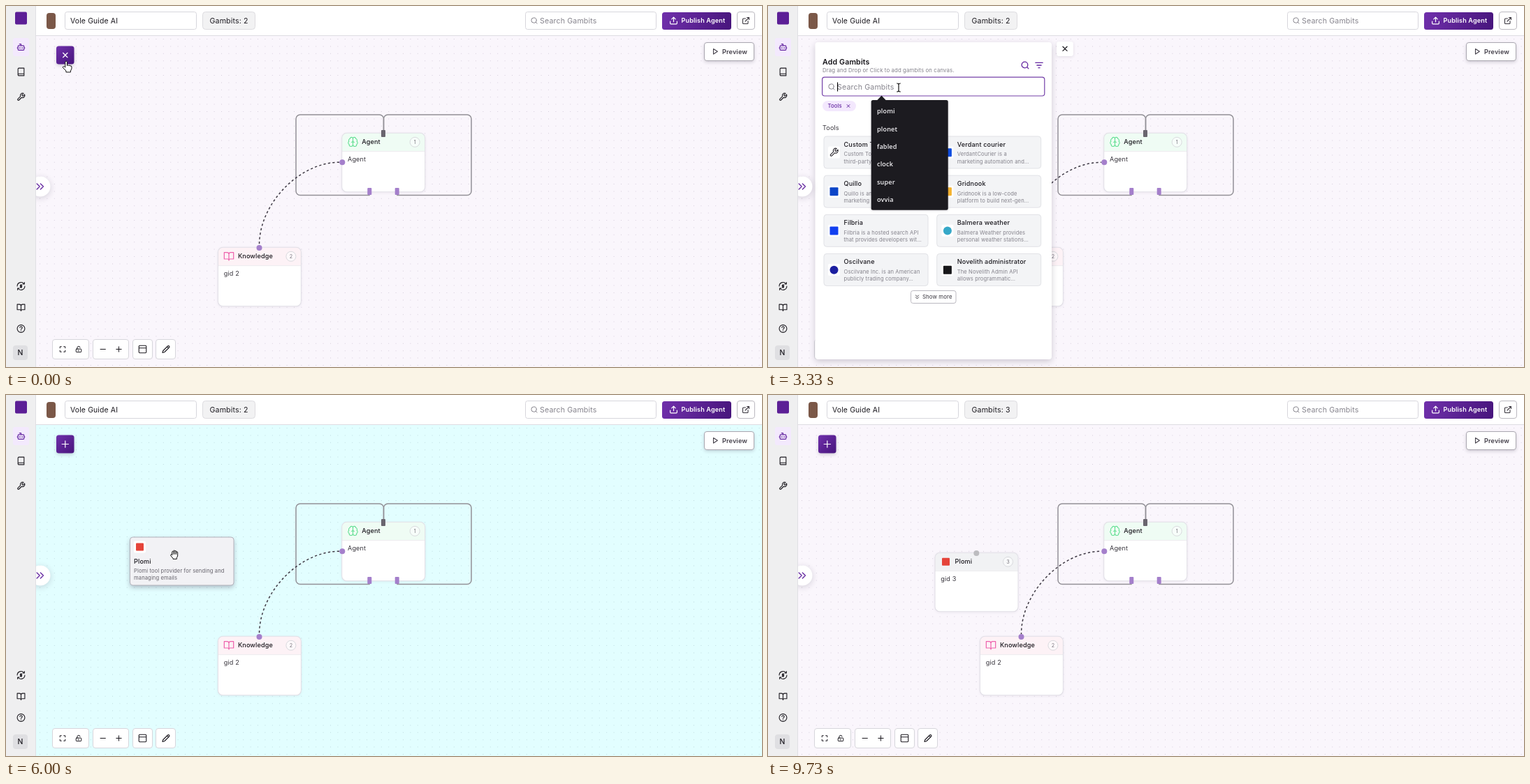
An HTML page with a canvas that plays this animation: 1082 by 518 pixels, repeating every 9.8 s.

```html
<!DOCTYPE html>
<html lang="en">
<head>
<meta charset="utf-8">
<title>Agent builder</title>
<style>
html, body { margin: 0; width: 100%; height: 100%; overflow: hidden; background: #fff; }
canvas { display: block; width: 1082px; height: 518px; }
</style>
</head>
<body>
<canvas id="stage"></canvas>
<script>
const W = 1082, H = 518, LOOP = 9800;
const canvas = document.getElementById('stage');
const dpr = window.devicePixelRatio || 1;
canvas.width = W * dpr;
canvas.height = H * dpr;
const c = canvas.getContext('2d');

const PURPLE = '#6427a0', INK = '#1c1a20', GRAY = '#85838c', LINE = '#d7d6dc', LILAC = '#a47fcb';

// Event times in ms
const T = { open: 100, filter: 1600, focus: 2150, results: 3900, grab: 5080, drop: 6170, loaded: 8400 };
const KEYS = [3350, 3550, 3750, 3950, 4150];
const WORD = 'plomi';

const ICON = {
  search: 'M19 11a8 8 0 1 1-16 0a8 8 0 1 1 16 0M21 21l-4.3-4.3',
  upload: 'M12 15V3M7 8l5-5l5 5M3 14v5a2 2 0 0 0 2 2h14a2 2 0 0 0 2-2v-5',
  external: 'M15 3h6v6M10 14L21 3M18 13v6a2 2 0 0 1-2 2H5a2 2 0 0 1-2-2V8a2 2 0 0 1 2-2h6',
  play: 'M6 3l14 9l-14 9z',
  bot: 'M12 8V4H8M6 8h12a2 2 0 0 1 2 2v8a2 2 0 0 1-2 2H6a2 2 0 0 1-2-2v-8a2 2 0 0 1 2-2zM2 14h2M20 14h2M15 13v2M9 13v2',
  book: 'M4 19.5v-15A2.5 2.5 0 0 1 6.5 2H20v20H6.5a2.5 2.5 0 0 1 0-5H20',
  wrench: 'M14.7 6.3a1 1 0 0 0 0 1.4l1.6 1.6a1 1 0 0 0 1.4 0l3.8-3.8a6 6 0 0 1-7.9 7.9l-6.9 6.9a2.1 2.1 0 0 1-3-3l6.9-6.9a6 6 0 0 1 7.9-7.9z',
  money: 'M2 12a10 10 0 0 1 18-6M21 2v4.5h-4.5M22 12a10 10 0 0 1-18 6M3 22v-4.5h4.5M14.5 9.5h-3.5a1.2 1.2 0 0 0 0 2.5h2a1.2 1.2 0 0 1 0 2.5h-3.5M12 7.5v9',
  pages: 'M2 4h6a4 4 0 0 1 4 4v13a3 3 0 0 0-3-3H2zM22 4h-6a4 4 0 0 0-4 4v13a3 3 0 0 1 3-3h7z',
  help: 'M22 12a10 10 0 1 1-20 0a10 10 0 1 1 20 0M9 9a3 3 0 0 1 6 1c0 2-3 2.5-3 4M12 17v.3',
  chevrons: 'M4 5l7 7l-7 7M13 5l7 7l-7 7',
  down: 'M7 6l5 5l5-5M7 13l5 5l5-5',
  cross: 'M5 5l14 14M19 5L5 19',
  plus: 'M12 4v16M4 12h16',
  minus: 'M4 12h16',
  filter: 'M2 5h20M6 12h12M10 19h4',
  expand: 'M3 8V3h5M16 3h5v5M21 16v5h-5M8 21H3v-5',
  lock: 'M5 11h14a2 2 0 0 1 2 2v7a2 2 0 0 1-2 2H5a2 2 0 0 1-2-2v-7a2 2 0 0 1 2-2zM7 11V7a5 5 0 0 1 9.9-1M12 15v3',
  panel: 'M5 3h14a2 2 0 0 1 2 2v14a2 2 0 0 1-2 2H5a2 2 0 0 1-2-2V5a2 2 0 0 1 2-2zM3 9h18',
  pencil: 'M17 3a2.8 2.8 0 0 1 4 4L7.5 20.5L2 22l1.5-5.5zM15 5l4 4',
  brain: 'M12 5a3 3 0 0 0-6 0a4 4 0 0 0-2.5 5.8a4 4 0 0 0 .5 6.6A4 4 0 0 0 12 18zM12 5a3 3 0 0 1 6 0a4 4 0 0 1 2.5 5.8a4 4 0 0 1-.5 6.6A4 4 0 0 1 12 18zM9 13a4 4 0 0 0 3-4a4 4 0 0 0 3 4',
  file: 'M4 8V4a2 2 0 0 1 2-2h9l5 5v13a2 2 0 0 1-2 2H6a2 2 0 0 1-2-2v-3M15 2v5h5M14 13H2M6 9l-4 4l4 4',
  pointer: 'M8 13V3.5a1.8 1.8 0 0 1 3.6 0V10l1-.7l2 .7l1.5-.3l1.5 1l1.6-.2l1 1.6v4l-2 4v2.5H9.5V20L4 14.5a1.7 1.7 0 0 1 2.3-2.6z',
  hand: 'M7 13V6.5a1.5 1.5 0 0 1 3 0V4.5a1.5 1.5 0 0 1 3 0v.8a1.5 1.5 0 0 1 3 0v2a1.5 1.5 0 0 1 3 0V15l-2 4v2.5H9V20l-5-6a1.6 1.6 0 0 1 2.4-2zM10 6.5V11M13 5.5V11M16 7V11'
};
for (const k in ICON) ICON[k] = new Path2D(ICON[k]);

// name, description lines, mark colour, round mark
const TOOLS = [
  ['Custom Tools', 'Custom Tools provider for', 'third-party API integrations…', null],
  ['Verdant courier', 'VerdantCourier is a', 'marketing automation and…', '#0d4de0'],
  ['Quillo', 'Quillo is an SEO and', 'marketing platform offering…', '#0c45c8'],
  ['Gridnook', 'Gridnook is a low-code', 'platform to build next-gen…', '#f5b32e'],
  ['Filbria', 'Filbria is a hosted search API', 'that provides developers wit…', '#123ff0'],
  ['Balmera weather', 'Balmera Weather provides', 'personal weather stations…', '#36a8c8', 1],
  ['Oscilvane', 'Oscilvane Inc. is an American', 'publicly trading company…', '#1c1fa0', 1],
  ['Novelith administrator', 'The Novelith Admin API', 'allows programmatic…', '#17171a']
];
const FOUND = [
  ['Plomi', 'Plomi tool provider for', 'sending and managing…', '#e5443a'],
  ['Tallposter', 'Tallposter is an email', 'marketing platform designe…', '#4a9bdc', 1],
  ['Plonetsuper', 'Plonet Super App combines', 'all Plonet services including…', '#4285f4', 1],
  ['Plonettasks', 'Plonet Tasks provides a', 'simple to-do list and task…', '#2a6cf0', 1]
];
const HINTS = ['plomi', 'plonet', 'fabled', 'clock', 'super', 'ovvia'];

// Cursor path: time, x, y
const PATH = [
  [0, 86, 80], [250, 86, 80], [800, 106, 99], [880, 106, 99], [1070, 128, 123], [1400, 158, 145],
  [1700, 158, 145], [2130, 187, 117], [4250, 187, 117], [4600, 147, 188], [4900, 144, 212],
  [5070, 144, 212], [5950, 241, 229], [6900, 241, 229], [7700, 190, 333], [7820, 190, 333],
  [8000, 181, 347], [8150, 181, 347], [8900, 82, 534]
];

const clamp = v => Math.max(0, Math.min(1, v));
const ease = v => { v = clamp(v); return v * v * (3 - 2 * v); };

function text(s, x, cy, size, color = INK, weight = 400, align = 'left', family = 'Inter') {
  c.font = `${weight} ${size}px ${family}, sans-serif`;
  c.letterSpacing = size * 0.015 + 'px';
  c.textAlign = align;
  c.fillStyle = color;
  c.fillText(s, x, cy + size * 0.36);
}

const note = (s, x, cy, color = GRAY) => text(s, x, cy, 7.6, color);

function box(x, y, w, h, r, fill, stroke, lw = 1) {
  c.beginPath();
  c.roundRect(x, y, w, h, r);
  if (fill) { c.fillStyle = fill; c.fill(); }
  if (stroke) { c.strokeStyle = stroke; c.lineWidth = lw; c.stroke(); }
}

function disc(x, y, r, fill, stroke) {
  box(x - r, y - r, 2 * r, 2 * r, r, fill, stroke);
}

function shadow(blur, dy, alpha, draw) {
  c.save();
  c.shadowColor = `rgba(40,30,60,${alpha})`;
  c.shadowBlur = blur * dpr;
  c.shadowOffsetY = dy * dpr;
  draw();
  c.restore();
}

function icon(name, x, y, size, color, lw = 1.2, fill) {
  const k = size / 24;
  c.save();
  c.translate(x - size / 2, y - size / 2);
  c.scale(k, k);
  c.lineCap = c.lineJoin = 'round';
  c.lineWidth = lw / k;
  c.strokeStyle = color;
  if (fill) { c.fillStyle = fill; c.fill(ICON[name]); }
  c.stroke(ICON[name]);
  c.restore();
}

function mark(x, y, color, round, r = 7) {
  if (round) disc(x, y, r, color);
  else box(x - r, y - r, 2 * r, 2 * r, 1, color);
}

function purple(x, y, w, h) {
  const g = c.createLinearGradient(x, y, x + w, y + h);
  g.addColorStop(0, '#7030ab');
  g.addColorStop(1, '#47157c');
  box(x, y, w, h, 3.5, g);
}

function dots(cyan) {
  c.fillStyle = cyan ? '#e2feff' : '#faf6fc';
  c.fillRect(43, 42, W, H);
  c.fillStyle = cyan ? '#bfdbe0' : '#d6cedc';
  c.beginPath();
  for (let y = 47; y < H; y += 10.4)
    for (let x = 48; x < W; x += 10.4) c.rect(x, y, 1, 1);
  c.fill();
}

function loopEdge(x0, side) {
  c.beginPath();
  c.moveTo(x0, 268);
  c.lineTo(x0, 271.5);
  c.arcTo(side, 271.5, side, 156, 6);
  c.arcTo(side, 156, 540.5, 156, 6);
  c.arcTo(540.5, 156, 540.5, 180, 6);
  c.lineTo(540.5, 180);
  c.strokeStyle = '#929096';
  c.lineWidth = 1.5;
  c.stroke();
}

function node(x, y, title, body, tint, count) {
  shadow(4, 1, 0.08, () => box(x, y, 119, 84.5, 7, '#fff'));
  box(x, y, 119, 26, [7, 7, 0, 0], tint);
  c.fillStyle = '#e8e7ec';
  c.fillRect(x, y + 26, 119, 0.8);
  box(x, y, 119, 84.5, 7, null, '#e2e0e7', 1.1);
  text(title, x + 28.5, y + 12.7, 9.1, INK, 500);
  text(body, x + 8.3, y + 37.5, 9.1, '#39363e');
  if (count) {
    disc(x + 104.5, y + 13, 7, 'rgba(255,255,255,.5)', '#d9dade');
    text(count, x + 104.5, y + 13, 7.2, '#77747d', 400, 'center');
  }
}

function graph(t) {
  loopEdge(520, 415);
  loopEdge(560, 666);
  node(480.7, 182.3, 'Agent', 'Agent', '#effcf4', '1');
  icon('brain', 496.5, 195, 16, '#62df92', 1.1);
  node(303.4, 346.3, 'Knowledge', 'gid 2', '#fdf2f6', '2');
  icon('pages', 319, 359, 16, '#ee62ad', 1.2);

  c.save();
  c.setLineDash([3.25, 3.25]);
  c.lineDashOffset = -6.5 * (t % 500) / 500;
  c.beginPath();
  c.moveTo(477, 224.3);
  c.bezierCurveTo(419.75, 224.3, 362.5, 283.6, 362.5, 343);
  c.strokeStyle = '#3f3a45';
  c.lineWidth = 1.5;
  c.stroke();
  c.restore();

  box(537, 178, 6, 10, 1, '#6a656f');
  box(517.3, 261, 6, 10, 1, LILAC);
  box(556.7, 261, 6, 10, 1, LILAC);
  disc(481.3, 224.3, 4, LILAC);
  disc(362.5, 347, 4, LILAC);
  if (t >= T.drop) newNode(t);
}

function newNode(t) {
  const done = t >= T.loaded;
  node(239, 226.3, 'Plomi', done ? 'gid 3' : 'Loading…', '#f1f2f4', done ? '3' : '');
  mark(254.5, 239.3, '#e5443a', false, 5.5);
  if (!done) {
    disc(338.5, 239.3, 10.8, '#f7f7f8', '#dcdce0');
    const a = t / 1000 * Math.PI * 2 + 1;
    c.beginPath();
    c.arc(338.5, 239.3, 5, a, a + 4.6);
    c.strokeStyle = '#3d3a42';
    c.lineWidth = 1.2;
    c.stroke();
  }
  disc(298.3, 227, 4, '#bcbcbf');
}

function canvasTools(t) {
  shadow(5, 2, 0.2, () => purple(72, 57.5, 25.5, 26));
  icon(t < T.grab ? 'cross' : 'plus', 84.8, 70.5, t < T.grab ? 11 : 14, '#fff', 1.2);
  for (const [x, w] of [[66.5, 52], [124.5, 51], [181.5, 28], [214.5, 28]])
    box(x, 478.5, w, 28, 3.5, '#fff', LINE);
  icon('expand', 81, 492.5, 10, INK, 1);
  icon('lock', 104, 492.5, 10, INK, 1);
  icon('minus', 138.7, 492.5, 11, INK, 1);
  icon('plus', 161.5, 492.5, 11, INK, 1);
  icon('panel', 195.5, 492.5, 14, INK, 1.1);
  icon('pencil', 229, 492.5, 12, INK, 1.1);
}

function preview() {
  shadow(5, 2, 0.22, () => box(999.5, 52.5, 71, 26, 3.5, '#fff'));
  box(999.5, 52.5, 71, 26, 3.5, null, '#aaa7b0');
  icon('play', 1015, 65.3, 10, '#45414b', 1.1);
  text('Preview', 1025, 65.3, 9.1, '#45414b', 600);
}

function header(t) {
  c.fillStyle = '#fff';
  c.fillRect(43, 0, W, 42);
  c.fillStyle = '#dedce2';
  c.fillRect(43, 42, W, 1);
  box(58, 10, 13, 23, 4, '#7b5848');
  box(84.5, 8.5, 188, 25, 3, '#fff', LINE);
  text('Vole Guide AI', 92, 21.3, 10.4);
  box(281.5, 8.5, 75, 25, 4, '#f2f2f3', '#dddce0');
  text(`Gambits: ${t >= T.loaded ? 3 : 2}`, 291.5, 21.3, 10.6);
  box(743.5, 8.5, 187, 25, 3, '#fff', LINE);
  icon('search', 756, 21, 11, GRAY, 1);
  text('Search Gambits', 764, 21.3, 10.6, GRAY);
  purple(939, 9, 99, 25);
  icon('upload', 955.5, 21, 13, '#fff', 1.2);
  text('Publish Agent', 966.5, 21, 9.1, '#fff', 600);
  box(1046.5, 8.5, 25, 25, 3.5, '#fff', '#bbb9c0');
  icon('external', 1059, 21, 12, '#39363e', 1.1);
}

function sidebar() {
  shadow(10, 2, 0.18, () => disc(49, 259, 14.5, '#fff'));
  icon('chevrons', 48.8, 259, 14, PURPLE, 1.3);
  c.fillStyle = '#efeff0';
  c.fillRect(0, 0, 42.5, H);
  c.fillStyle = '#e0dfe3';
  c.fillRect(42, 0, 1, H);
  box(13, 8.5, 17, 18, 2, '#5c1f96');
  box(10, 46, 23, 26, 3, '#f3e9fd');
  icon('bot', 21.5, 59, 13, PURPLE, 1.2);
  const items = { book: 94.5, wrench: 130.5, money: 402, pages: 432.5, help: 463 };
  for (const k in items) icon(k, 21.5, items[k], 13, INK, 1.1);
  box(10, 487, 21, 21, 4, '#dfdfe2');
  text('N', 20.5, 497.5, 10.4, INK, 500, 'center');
}

function card(x, y, item, iconX, textX) {
  const [name, a, b, color, round] = item;
  box(x, y, 149, 46, 4, '#f3f4f6', '#e1e2e6');
  box(iconX - 8.5, y + 14.5, 17, 17, 2, '#fff');
  if (color) mark(iconX, y + 23.2, color, round, 6);
  else icon('wrench', iconX, y + 23, 14, '#29262d', 1.1);
  text(name, textX, y + 11.5, 9.1, INK, 500);
  note(a, textX, y + 25.7);
  note(b, textX, y + 35.9);
}

function cards(list, y, col) {
  list.forEach((item, i) => {
    const right = i % 2, x = right ? col : 80;
    const ix = right ? col + 15.2 : 94.5;
    card(x, y + 56.15 * (i >> 1), item, ix, right ? col + 29 : 108.5);
  });
}

function aiCard(x, name, glyph, color, fill, edge, lines) {
  box(x, 186.5, 149, 90, 4, fill, edge);
  icon(glyph, x + 14.5, 201, 16, color, 1.3);
  text(name, x + 5.5, 221.3, 9.1, INK, 500);
  lines.forEach((s, i) => note(s, x + 5.5, 235.5 + 10.15 * i));
}

function browseList() {
  c.save();
  c.beginPath();
  c.rect(67, 128, 329, 374);
  c.clip();
  for (const [s, x, w] of [['AI Gambits', 78, 57.5], ['Tools', 141, 35.5], ['Knowledge', 182, 57.5],
    ['User Inputs', 245, 57.5], ['Integration Gambits', 308, 95]]) {
    box(x, 136, w, 15, 7.5, '#f0f0f2');
    text(s, x + (x > 300 ? 7.5 : w / 2), 143.4, 7.6, '#39363e', 500, x > 300 ? 'left' : 'center');
  }
  text('AI Gambits', 78, 175, 9.1, '#39363e');
  aiCard(80, 'Agent', 'brain', '#22c55e', '#f0fdf4', '#a9e8c0',
    ['Gambits that use AI to have', 'conversations, use tools to perform', 'complex actions, and automate', 'various tasks.']);
  aiCard(238.5, 'Data Collector', 'file', '#38b6f0', '#f0f8ff', '#aedcf6',
    ['Extract specific information and', 'properties from user messages', 'automatically for structured data', 'processing and referencing.']);
  text('Tools', 78, 298, 9.1, '#39363e');
  cards(TOOLS, 309, 238.5);
  box(390, 173, 4, 116, 2, '#c4c3c8');
  c.fillStyle = '#b3b2b8';
  for (const [y, d] of [[169, -2.5], [496, 2.5]]) {
    c.beginPath();
    c.moveTo(389.8, y);
    c.lineTo(394.2, y);
    c.lineTo(392, y + d);
    c.fill();
  }
  c.restore();
}

function filteredList(t) {
  box(78, 136, 48, 15, 7.5, '#f3e8fd');
  text('Tools', 85.5, 143.4, 7.6, PURPLE, 500);
  icon('cross', 115, 143.5, 6.5, PURPLE, 1);
  text('Tools', 78, 175, 9.1, '#39363e');
  if (t >= T.results) return cards(FOUND, 187, 241.7);
  cards(TOOLS, 187, 241.7);
  box(204.5, 408.5, 64.5, 18, 3, '#fff', '#bbb9c0');
  icon('down', 213.5, 417.5, 10, '#39363e', 1);
  text('Show more', 221, 417.5, 7.8, '#39363e');
}

function hintMenu(typed) {
  const rows = HINTS.filter(s => s.startsWith(typed));
  const h = 5.4 + 25.4 * rows.length;
  c.fillStyle = '#1c1b20';
  c.beginPath();
  c.moveTo(156, 135.5);
  c.lineTo(162.5, 128.5);
  c.lineTo(169, 135.5);
  c.fill();
  shadow(3, 1, 0.2, () => box(147.7, 135, 110, h, 2.5, '#1c1b20'));
  rows.forEach((s, i) => text(s, 156, 151 + 25.4 * i, 9.1, '#f4f3f6', 600, 'left', '"Open Sans"'));
}

function searchField(t, typed) {
  const focus = t >= T.focus;
  if (focus) box(77.6, 102.2, 318.2, 26.8, 3.5, '#fff', '#7440a8', 1.2);
  else box(78.5, 102.5, 317, 26, 3.5, '#fff', LINE);
  icon('search', 91, 116, 11, GRAY, 1);
  if (!typed) text('Search Gambits', 99, 116, 10.6, GRAY);
  else {
    icon('cross', 381.5, 115.7, 8, GRAY, 1);
    text(typed, 99, 116, 10.6);
  }
  const end = 99 + (typed ? c.measureText(typed).width : 0);
  if (typed) {
    c.beginPath();
    for (let x = 99; x <= end; x += 0.5) c.lineTo(x, 122.3 + 0.8 * Math.sin(x * 2));
    c.strokeStyle = '#d8434a';
    c.lineWidth = 0.8;
    c.stroke();
  }
  const last = typed ? KEYS[typed.length - 1] : T.focus;
  if (focus && (t - last) % 1060 < 530) {
    c.fillStyle = '#000';
    c.fillRect(end, 109.5, 1.1, 13);
  }
}

function panel(t) {
  const shown = t < T.grab ? ease((t - T.open) / 230) : 1 - ease((t - T.grab) / 150);
  if (shown <= 0) return;
  const typed = WORD.slice(0, KEYS.filter(k => t >= k).length);
  c.save();
  c.globalAlpha = shown;
  c.translate(-10 * (1 - shown), 0);
  shadow(10, 3, 0.22, () => box(67.5, 52, 338.5, 455, 4, '#fff'));
  shadow(4, 1, 0.12, () => box(413, 51, 24, 21, 3.5, '#fff'));
  icon('cross', 425, 61.3, 10.5, INK, 1.2);
  text('Add Gambits', 78, 80, 10.6, '#141217', 600);
  text('Drag and Drop or Click to add gambits on canvas.', 78, 92, 7.8, GRAY);
  icon('search', 368, 85, 13, PURPLE, 1.3);
  icon('filter', 388, 85, 12.5, PURPLE, 1.3);
  if (t < T.filter) browseList();
  else filteredList(t);
  searchField(t, typed);
  if (t >= T.focus + 50) hintMenu(typed);
  c.restore();
}

function cursorAt(t) {
  const i = PATH.findIndex(p => p[0] > t);
  if (i < 1) return null;
  const [t0, x0, y0] = PATH[i - 1], [t1, x1, y1] = PATH[i];
  const k = ease((t - t0) / (t1 - t0));
  return [x0 + (x1 - x0) * k, y0 + (y1 - y0) * k];
}

function dragCard(x, y) {
  shadow(7, 3, 0.3, () => box(x, y, 148.5, 69, 4, '#f2f2f5'));
  box(x, y, 148.5, 69, 4, null, '#b3b2bb');
  box(x + 5.5, y + 5.5, 17, 17, 2, '#fff');
  mark(x + 14, y + 14, '#e5443a', false, 5.5);
  text('Plomi', x + 5.5, y + 34.3, 9.1, INK, 500);
  note('Plomi tool provider for sending and', x + 5.5, y + 48.4, '#67646d');
  note('managing emails', x + 5.5, y + 58.6, '#67646d');
}

function ibeam(x, y) {
  for (const [color, lw] of [['#fff', 2.6], ['#111', 1.2]]) {
    c.beginPath();
    c.moveTo(x - 2.8, y - 6);
    c.quadraticCurveTo(x, y - 6, x, y - 4.5);
    c.quadraticCurveTo(x, y - 6, x + 2.8, y - 6);
    c.moveTo(x, y - 5);
    c.lineTo(x, y + 5);
    c.moveTo(x - 2.8, y + 6);
    c.quadraticCurveTo(x, y + 6, x, y + 4.5);
    c.quadraticCurveTo(x, y + 6, x + 2.8, y + 6);
    c.strokeStyle = color;
    c.lineWidth = lw;
    c.stroke();
  }
}

function cursor(t, [x, y]) {
  if (t < 400 || (t >= 1250 && t < 1950)) icon('pointer', x + 1.8, y + 7, 18, '#111', 1, '#fff');
  else if (t < 4400) ibeam(x, y);
  else icon('hand', x, y, 16, '#111', 1, '#fff');
}

function draw(t) {
  c.setTransform(dpr, 0, 0, dpr, 0, 0);
  const dragging = t >= T.grab && t < T.drop;
  const pos = cursorAt(t);
  dots(dragging);
  graph(t);
  canvasTools(t);
  preview();
  panel(t);
  header(t);
  sidebar();
  if (dragging) dragCard(pos[0] - 63.5, pos[1] - 25);
  if (pos) cursor(t, pos);
}

function tick() {
  draw(performance.now() % LOOP);
  requestAnimationFrame(tick);
}
tick();
</script>
</body>
</html>
```
